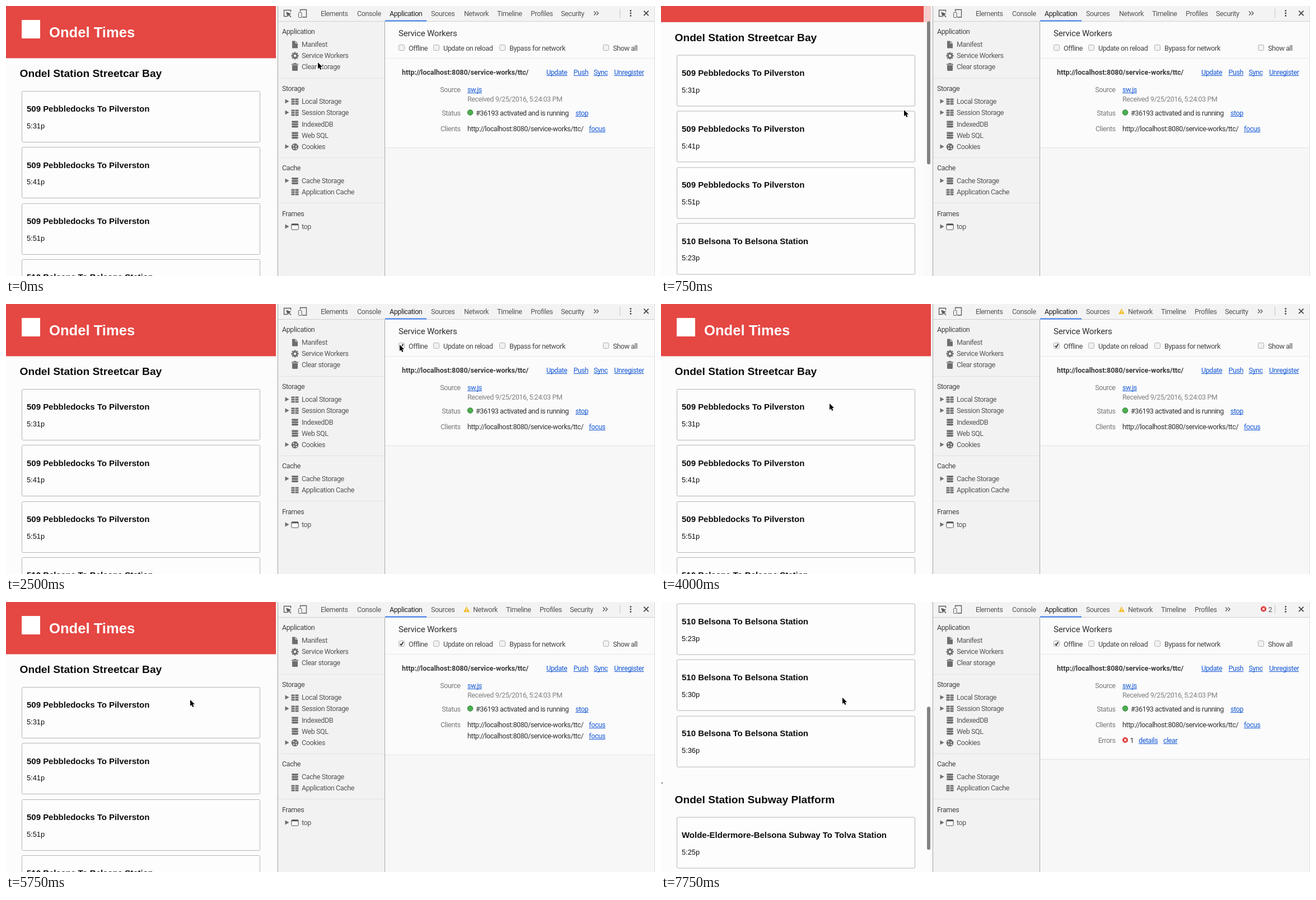
Recreate the animation shown at these times as an HTML page with a canvas. Size 1159 by 483 pixels, loop 8000 ms.

```html
<!DOCTYPE html>
<html lang="en">
<head>
<meta charset="utf-8">
<title>Offline service worker demo</title>
<style>
html, body { margin: 0; width: 1159px; height: 483px; overflow: hidden; background: #fcfcfc; }
canvas { display: block; }
</style>
</head>
<body>
<canvas id="stage" width="1159" height="483"></canvas>
<script>
const ctx = document.getElementById('stage').getContext('2d');
const LOOP = 8000, STEP = 250;
const UI = 'Roboto, Inter, sans-serif';
const PAGE = '"Liberation Sans", Arial, sans-serif';
const GREY = '#6e6e6e', DARK = '#303030', LINK = '#1257d6';

// step, x, y of the pointer tip
const pointerPath = [
  [0, 557, 101], [1, 470, 150], [2, 434, 186], [3, 434, 186], [4, 490, 165], [5, 645, 117],
  [7, 703, 73], [10, 703, 73], [12, 420, 150], [14, 190, 160], [16, 301, 178],
  [18, 90, -20], [19, 85, -20], [21, 329, 175], [23, 329, 175], [25, 127, 120],
  [27, 560, 140], [28, 601, 126], [30, 324, 171], [31, 324, 171]
];
const scrollPath = [
  [0, 0], [1, 0], [2, 120], [3, 64.5], [4, -18], [5, -3.5], [6, 0],
  [28, 0], [29, 30], [30, 230], [31, 450.4]
];

function along(path, s) {
  const i = path.findIndex(p => p[0] >= s);
  if (i <= 0) return path[i < 0 ? path.length - 1 : 0].slice(1);
  const a = path[i - 1], b = path[i], k = (s - a[0]) / (b[0] - a[0]);
  return b.slice(1).map((v, j) => a[j + 1] + (v - a[j + 1]) * k);
}

function rect(x, y, w, h, color) {
  ctx.fillStyle = color;
  ctx.fillRect(x, y, w, h);
}

function box(x, y, w, h, r, fill, stroke) {
  ctx.beginPath();
  ctx.roundRect(x, y, w, h, r);
  if (fill) { ctx.fillStyle = fill; ctx.fill(); }
  if (stroke) { ctx.strokeStyle = stroke; ctx.lineWidth = 1; ctx.stroke(); }
}

function poly(points, fill) {
  ctx.beginPath();
  points.forEach(([x, y]) => ctx.lineTo(x, y));
  ctx.closePath();
  ctx.fillStyle = fill;
  ctx.fill();
}

function lines(color, width, ...paths) {
  ctx.strokeStyle = color;
  ctx.lineWidth = width;
  ctx.beginPath();
  for (const p of paths) p.forEach(([x, y], i) => i ? ctx.lineTo(x, y) : ctx.moveTo(x, y));
  ctx.stroke();
}

function disc(x, y, r, fill, stroke) {
  ctx.beginPath();
  ctx.arc(x, y, r, 0, Math.PI * 2);
  if (fill) { ctx.fillStyle = fill; ctx.fill(); }
  if (stroke) { ctx.strokeStyle = stroke; ctx.lineWidth = 1; ctx.stroke(); }
}

function type(str, x, y, font, color, spacing = 0, align = 'left') {
  ctx.font = font;
  ctx.letterSpacing = spacing + 'px';
  ctx.textAlign = align;
  ctx.fillStyle = color;
  ctx.fillText(str, x, y);
  return ctx.measureText(str).width;
}

// Interface text, y is the middle of the capitals
const ui = (str, x, y, color = DARK, align = 'left') =>
  type(str, x, y + 4.4, '12.5px ' + UI, color, -0.4, align);

function link(str, x, y) {
  const w = ui(str, x, y, LINK);
  rect(x, Math.round(y + 5.4), w, 1, LINK);
}

// ---- web page ----
function card(y, title, time) {
  box(28.5, Math.round(y) + 0.5, 425, 91, 2, '#fdfdfd', '#b4b4b4');
  type(title, 37, y + 37.3, 'bold 14.98px ' + PAGE, '#0c0c0c');
  type(time, 37, y + 67, '12.8px ' + PAGE, '#0c0c0c');
}

function heading(str, y) {
  type(str, 24.5, y, 'bold 19.2px ' + PAGE, '#0c0c0c');
}

function drawPage(scroll) {
  ctx.save();
  ctx.beginPath();
  ctx.rect(0, 0, 482, 483);
  ctx.clip();
  ctx.translate(0, -scroll);
  rect(0, 0, 482, 93.4, '#e54743');
  rect(28, 25, 33, 33, '#fff');
  type('Ondel Times', 77, 55.5, 'bold 25.6px ' + PAGE, '#fff');
  heading('Ondel Station Streetcar Bay', 127.2);
  const rows = ['5:31p', '5:41p', '5:51p', '5:23p', '5:30p', '5:36p'];
  rows.forEach((time, i) => card(152 + i * 100.3,
    i < 3 ? '509 Pebbledocks To Pilverston' : '510 Belsona To Belsona Station', time));
  type(',', 0, 774.4, '12.8px ' + PAGE, '#0c0c0c');
  heading('Ondel Station Subway Platform', 810.2);
  card(835.2, 'Wolde-Eldermore-Belsona Subway To Tolva Station', '5:25p');
  ctx.restore();
}

function drawScrollbar(s, scroll) {
  const narrow = s === 2 || s === 3 || s >= 29;
  const wide = s >= 4 && s <= 6;
  if (!narrow && !wide) return;
  if (s === 3) rect(469, 0, 13, 483, 'rgba(250,250,250,.75)');
  if (wide) {
    rect(469, 0, 13, 483, '#fafafa');
    rect(469, 0, 1, 483, '#e9e9e9');
  }
  const top = Math.max(0, scroll * 0.4146);
  const end = scroll * 0.4146 + 256.5;
  if (wide) box(472, top + 1, 9, end - top - 1, 4.5, '#7d7d7d');
  else box(475, top + 0.5, 6, end - top - 0.5, 3, '#828282');
}

// ---- inspector ----
function warning(x, y) {
  poly([[x, y - 5], [x + 5.5, y + 5], [x - 5.5, y + 5]], '#f4bd27');
  rect(x - 0.5, y - 1.5, 1.2, 3.4, '#fff');
  rect(x - 0.5, y + 2.8, 1.2, 1.2, '#fff');
}

function errorDot(x, y) {
  disc(x, y, 5, '#dd3a36');
  lines('#fff', 1.2, [[x - 2, y - 2], [x + 2, y + 2]], [[x + 2, y - 2], [x - 2, y + 2]]);
}

function drawTabs(warned, failed) {
  rect(486, 0, 673, 27, '#f3f3f3');
  rect(486, 27, 673, 1, '#cfcfcf');
  lines('#5a5a5a', 1.3, [[502, 18.5], [496.5, 18.5], [496.5, 7.5], [508.5, 7.5], [508.5, 11]]);
  poly([[500, 10.5], [509.5, 14], [506, 15.4], [509.5, 19], [508.3, 20.3], [504.7, 16.6], [503.2, 20]], '#5a5a5a');
  lines('#5a5a5a', 1.3, [[525.5, 10], [525.5, 6.5], [536.5, 6.5], [536.5, 20], [529, 20]]);
  box(522.5, 11.5, 5.5, 9, 1, '#f3f3f3', '#5a5a5a');

  const dx = warned ? 16 : 0;
  const tabs = [['Elements', 562], ['Console', 627], ['Application', 685], ['Sources', 759],
    ['Network', 818 + dx], ['Timeline', 877 + dx], ['Profiles', 937 + dx]];
  if (!failed) tabs.push(['Security', 991 + dx]);
  for (const [name, x] of tabs) ui(name, x, 13.5, name === 'Application' ? '#222' : '#555');
  rect(677, 25.5, 74, 2, '#3b7ff0');
  if (warned) warning(822.5, 13);

  const more = failed ? 1008 : 1050 + dx;
  for (const x of [more, more + 4.5])
    lines('#555', 1.3, [[x, 9.5], [x + 3.5, 13], [x, 16.5]]);
  if (failed) {
    errorDot(1076, 12.5);
    ui('2', 1084.5, 13.5, '#555');
  }
  rect(1096, 5, 1, 16, '#c4c4c4');
  for (const y of [8.5, 13, 17.5]) disc(1115.5, y, 1.4, '#444');
  lines('#444', 1.7, [[1139, 8.7], [1147.5, 17.2]], [[1147.5, 8.7], [1139, 17.2]]);
}

const icons = {
  file(y) {
    poly([[511, y - 6.5], [517, y - 6.5], [521, y - 2.5], [521, y + 6.5], [511, y + 6.5]], GREY);
    lines('#f3f2f3', 1, [[517, y - 6.5], [517, y - 2.5], [521, y - 2.5]]);
  },
  gear(y) {
    for (let i = 0; i < 8; i++) {
      const a = i * Math.PI / 4;
      lines(GREY, 2.8, [[516, y], [516 + 6.6 * Math.cos(a), y + 6.6 * Math.sin(a)]]);
    }
    disc(516, y, 4.8, GREY);
    disc(516, y, 2.2, '#f3f2f3');
  },
  bin(y) {
    rect(510, y - 5.5, 12, 1.8, GREY);
    rect(513.5, y - 7, 5, 1.5, GREY);
    box(511, y - 3, 10, 10, [0, 0, 1.5, 1.5], GREY);
  },
  table(y) {
    for (let r = 0; r < 3; r++) {
      rect(509.5, y - 5.5 + r * 4, 6, 3, GREY);
      rect(516.5, y - 5.5 + r * 4, 6, 3, GREY);
    }
  },
  stack(y) {
    for (let r = 0; r < 3; r++) box(510, y - 6 + r * 4.3, 12, 3.4, [3, 3, 4, 4], GREY);
  },
  cookie(y) {
    disc(516, y, 6.3, GREY);
    for (const [x, dy] of [[513.5, -2.5], [518, -1], [514, 2.5], [518.5, 3], [521, -4.5]])
      disc(x, y + dy, 1.2, '#f3f2f3');
  },
  frame(y) {
    box(509.8, y - 5.2, 12.4, 10.4, 1.5, '#fafafa', '#505050');
    rect(510, y - 5.2, 12, 2.5, '#505050');
  }
};

const sidebar = [
  ['Application', 46],
  ['Manifest', 69, 'file'], ['Service Workers', 89, 'gear'], ['Clear storage', 109, 'bin'],
  ['Storage', 148],
  ['Local Storage', 171, 'table', true], ['Session Storage', 191, 'table', true],
  ['IndexedDB', 211.5, 'stack'], ['Web SQL', 231.5, 'stack'], ['Cookies', 252, 'cookie', true],
  ['Cache', 290],
  ['Cache Storage', 313, 'stack', true], ['Application Cache', 333, 'table'],
  ['Frames', 372],
  ['top', 395, 'frame', true]
];

function drawSidebar(cacheArrow) {
  rect(486, 28, 190, 455, '#f3f2f3');
  for (const y of [129, 271, 352]) rect(486, y, 190, 1, '#e2e2e2');
  for (const [name, y, icon, arrow] of sidebar) {
    ui(name, icon ? 528 : 493, y, icon ? '#555' : '#444');
    if (icon) icons[icon](y);
    if (arrow && (name !== 'Cache Storage' || cacheArrow))
      poly([[498.5, y - 4.5], [505.5, y - 0.5], [498.5, y + 3.5]], GREY);
  }
  rect(676, 28, 1, 455, '#a8a8a8');
}

function checkbox(x, label, on) {
  box(x + 0.5, 69.5, 10, 10, 2, '#f1f1f1', '#b0b0b0');
  if (on) lines('#333', 1.8, [[x + 2.8, 75], [x + 4.8, 77.3], [x + 8.4, 71.5]]);
  ui(label, x + 18, 75.5, '#444');
}

function label(str, y) {
  ui(str, 811.5, y, '#777', 'right');
}

function client(y) {
  ui('http://localhost:8080/service-works/ttc/', 824, y);
  link('focus', 1041, y);
}

function drawPanel(state, offline) {
  const bottom = { idle: 253, loading: 273, installing: 294, error: 281 }[state];
  rect(677, 28, 482, 455, '#f7f7f8');
  rect(677, 28, 482, bottom - 28, '#fbfbfb');
  rect(677, bottom, 482, 1, '#e3e3e3');
  rect(677, 93, 482, 1, '#e8e8e8');
  type('Service Workers', 701, 54, '15px ' + UI, DARK, -0.2);
  checkbox(701, 'Offline', offline);
  checkbox(763, 'Update on reload');
  checkbox(881, 'Bypass for network');
  checkbox(1066, 'Show all');

  type('http://localhost:8080/service-works/ttc/', 707, 123.4, 'bold 12.5px ' + UI, '#3a3a3a');
  link('Update', 965, 119);
  link('Push', 1013.5, 119);
  link('Sync', 1049.5, 119);
  link('Unregister', 1086, 119);

  label('Source', 150);
  link('sw.js', 824, 150);
  ui('Received 9/25/2016, 5:24:03 PM', 824, 167, '#808080');
  label('Status', 191.5);
  const installing = state === 'installing';
  if (installing) {
    rect(828.5, 196, 1, 17, '#777');
    disc(829, 218, 4.5, '#fbfbfb', '#555');
    ui('#36194 installing', 839, 219);
    ui('12/31/1969, 7:00:00 PM', 838, 236, '#808080');
  }
  disc(829, 190.5, 4.8, '#4caf50', '#37803b');
  ui('#36193 activated and is running', 839, 191.5);
  link('stop', 1017, 191.5);

  const y = installing ? 261 : 219.5;
  label('Clients', y);
  client(y);
  if (state === 'loading') client(240);
  if (state === 'error') {
    label('Errors', 248);
    errorDot(829, 247);
    ui('1', 837.5, 248);
    link('details', 853, 248);
    link('clear', 897, 248);
  }
}

function drawPointer(x, y) {
  const shape = [[0, 0], [0, 11.2], [2.6, 8.9], [4.4, 13], [6.4, 12.1], [4.6, 8.1], [8, 8]]
    .map(([a, b]) => [x + a, y + b]);
  poly(shape, '#000');
  ctx.strokeStyle = '#fff';
  ctx.lineWidth = 1.8;
  ctx.lineJoin = 'round';
  ctx.stroke();
  poly(shape, '#000');
  ctx.lineJoin = 'miter';
}

function draw(s) {
  const [scroll] = along(scrollPath, s);
  const state = s < 21 ? 'idle' : s < 25 ? 'loading' : s < 29 ? 'installing' : 'error';
  rect(0, 0, 1159, 483, '#fcfcfc');
  drawPage(scroll);
  drawScrollbar(s, scroll);
  rect(482, 0, 3, 483, '#f6f6f6');
  rect(485, 0, 1, 483, '#a8a8a8');
  drawPanel(state, s >= 9);
  drawSidebar(s < 19 || s >= 25);
  drawTabs(s >= 11, s >= 25);
  rect(1158, 0, 1, 483, '#dcdcdc');
  drawPointer(...along(pointerPath, s));
}

function tick() {
  draw(Math.floor(performance.now() % LOOP / STEP));
  requestAnimationFrame(tick);
}
tick();
</script>
</body>
</html>
```
